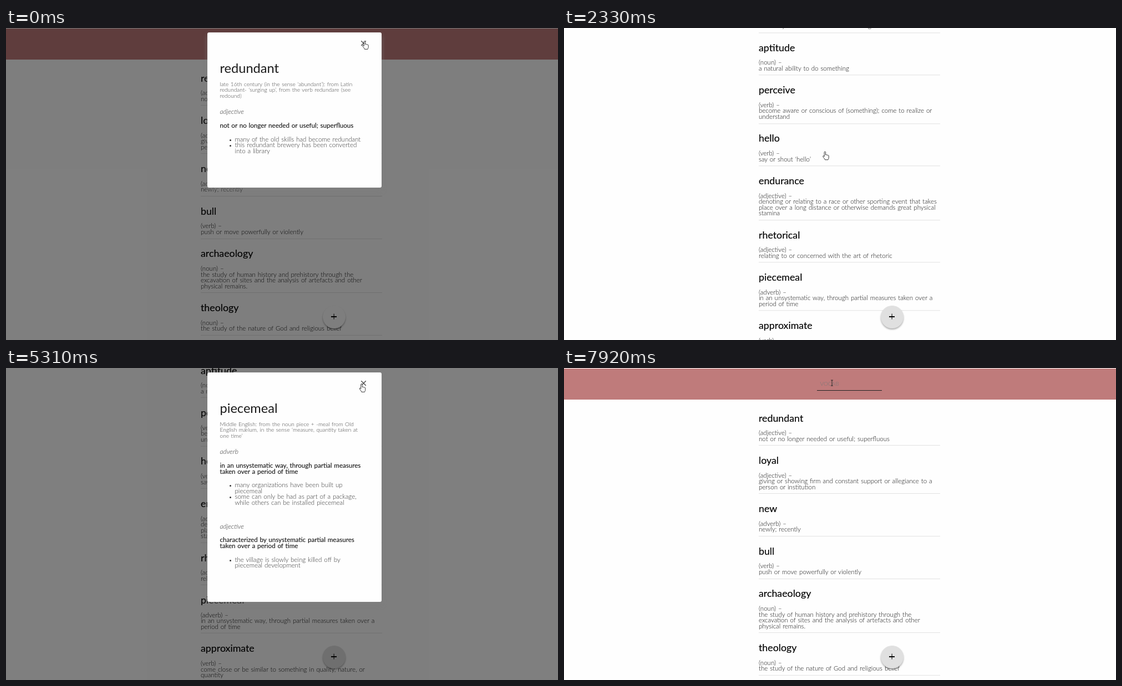
These frames come from a looping animation (995 by 563 pixels, 8000 ms). An HTML page:

```html
<!DOCTYPE html>
<html lang="en">
<head>
<meta charset="utf-8">
<title>Vocabulary list</title>
<style>
  * { margin: 0; padding: 0; box-sizing: border-box; }
  html, body { width: 100%; height: 100%; overflow: hidden; background: #fefefe; }
  body { position: relative; font: 300 11.5px/10.55px Lato, sans-serif; word-spacing: .8px; color: #111; white-space: nowrap; }
  body > *, header * { position: absolute; }

  #page { left: 0; top: 0; width: 995px; }
  header { position: absolute; top: 1px; width: 995px; height: 56px; background: #bf7b7b; }
  #field { left: 456px; top: 15px; width: 117px; height: 25px; padding: 7px 5.5px; border-bottom: 1px solid #222; font-size: 10px; color: #777; }
  #caret { left: 461px; top: 23px; width: 1px; height: 10px; background: #111; }

  #list { position: absolute; left: 351px; top: 79.5px; width: 327px; }
  article { margin-bottom: 15.8px; padding-bottom: 6px; border-bottom: 1px solid #e2e2e2; }
  h2 { margin-bottom: 12.7px; font: 17.8px/20px Lato, sans-serif; color: #000; -webkit-text-stroke: .15px; }

  #add { left: 570.5px; top: 500.5px; width: 41px; height: 41px; border-radius: 50%; box-shadow: 0 2px 3px rgba(0,0,0,.32); }
  #add::before, #add::after { content: ""; position: absolute; left: 15.5px; top: 19.9px; width: 10px; height: 1.2px; background: #000; }
  #add::after { transform: rotate(90deg); }

  .shade { inset: 0; background: rgba(0,0,0,.5); }
  .dialog { position: absolute; left: 362.5px; top: 7.5px; width: 314.5px; padding: 50.5px 23px 47.7px; border-radius: 3px; background: #fefefe; box-shadow: 0 5px 9px rgba(127,127,127,.6); }
  .close { position: absolute; left: 277px; top: 15.5px; width: 9px; height: 9px; stroke: #444; stroke-width: 1.3; }
  h1 { font: 23.6px/28px Lato, sans-serif; color: #1c1c1c; }
  .origin { margin-top: 10px; font-size: 10.1px; line-height: 10.4px; color: #444; }
  .kind { margin-top: 18.2px; font-size: 12px; line-height: 12px; font-style: italic; color: #333; }
  .meaning { margin-top: 13.6px; font-weight: 400; font-size: 11.6px; -webkit-text-stroke: .1px; }
  ul { margin-top: 14.2px; padding: 0 0 13px 27px; list-style: none; color: #333; }
  li { position: relative; }
  li::before { content: ""; position: absolute; left: -9.5px; top: 5px; width: 3px; height: 3px; border-radius: 50%; background: #333; }

  #cursor { left: 0; top: 0; width: 1px; height: 1px; overflow: visible; stroke-width: .9; stroke-linejoin: round; }
</style>
</head>
<body>
<div id="page">
  <header><div id="field">VOCAB</div><div id="caret"></div></header>
  <div id="list"></div>
</div>
<div id="add"></div>
<svg id="cursor"><path fill="#fff" stroke="#222"/></svg>

<script>
const LOOP = 8000, TRAVEL = 400;
const $ = id => document.getElementById(id);
const lines = text => text.replaceAll('|', '<br>');

const words = [
  ['redundant', 'adjective', 'not or no longer needed or useful; superfluous'],
  ['loyal', 'adjective', 'giving or showing firm and constant support or allegiance to a|person or institution'],
  ['new', 'adverb', 'newly; recently'],
  ['bull', 'verb', 'push or move powerfully or violently'],
  ['archaeology', 'noun', 'the study of human history and prehistory through the|excavation of sites and the analysis of artefacts and other|physical remains.'],
  ['theology', 'noun', 'the study of the nature of God and religious belief'],
  ['aptitude', 'noun', 'a natural ability to do something'],
  ['perceive', 'verb', 'become aware or conscious of (something); come to realize or|understand'],
  ['hello', 'verb', 'say or shout ‘hello’'],
  ['endurance', 'adjective', 'denoting or relating to a race or other sporting event that takes|place over a long distance or otherwise demands great physical|stamina'],
  ['rhetorical', 'adjective', 'relating to or concerned with the art of rhetoric'],
  ['piecemeal', 'adverb', 'in an unsystematic way, through partial measures taken over a|period of time'],
  ['approximate', 'verb', 'come close or be similar to something in quality, nature, or|quantity'],
];
$('list').innerHTML = words.map(([word, kind, meaning]) =>
  `<article><h2>${word}</h2><p>(${kind}) –<br>${lines(meaning)}</p></article>`).join('');

function addDialog(word, origin, senses) {
  const shade = document.createElement('div');
  shade.className = 'shade';
  shade.innerHTML = `<div class="dialog">
    <svg class="close" viewBox="0 0 9 9"><path d="M0 0L9 9M9 0L0 9"/></svg>
    <h1>${word}</h1><p class="origin">${lines(origin)}</p>` +
    senses.map(([kind, meaning, ...examples]) =>
      `<p class="kind">${kind}</p><p class="meaning">${lines(meaning)}</p>
       <ul>${examples.map(e => `<li>${lines(e)}</li>`).join('')}</ul>`).join('') + '</div>';
  $('cursor').before(shade);
  return shade;
}
const redundant = addDialog('redundant',
  'late 16th century (in the sense ‘abundant’): from Latin|redundant- ‘surging up’, from the verb redundare (see|redound)',
  [['adjective', 'not or no longer needed or useful; superfluous',
    'many of the old skills had become redundant',
    'this redundant brewery has been converted|into a library']]);
const piecemeal = addDialog('piecemeal',
  'Middle English: from the noun piece + -meal from Old|English mǣlum, in the sense ‘measure, quantity taken at|one time’',
  [['adverb', 'in an unsystematic way, through partial measures|taken over a period of time',
    'many organizations have been built up|piecemeal',
    'some can only be had as part of a package,|while others can be installed piecemeal'],
   ['adjective', 'characterized by unsystematic partial measures|taken over a period of time',
    'the village is slowly being killed off by|piecemeal development']]);

const hand = 'M-2.8 1.5V-6.2a1.2 1.2 0 0 1 2.4 0V-1.5c.5-.8 2-.6 2.1.4 .5-.7 1.8-.4 1.9.5 .6-.5 1.6-.1 1.6.9V3.5C5.2 5.5 4 6 4 7.3H-1.6C-1.6 5.5-5.3 2.6-5.3 1c0-1.2 1.6-1.2 2.5.5z';
const beam = 'M-2-5H2M0-5V5M-2 5H2';

// Each stop is reached at `at`, after an eased move of TRAVEL ms
const pointer = [
  { at: 0, x: 648, y: 31, shape: hand },
  { at: 820, x: 482.5, y: 313, shape: hand },
  { at: 1390, x: 472, y: 230.5, shape: hand },
  { at: 3520, x: 437, y: 422, shape: hand },
  { at: 4350, x: 516.5, y: 240, shape: beam },
  { at: 5100, x: 642.5, y: 36, shape: hand },
  { at: 6670, x: 521, y: 200, shape: hand },
  { at: 7360, x: 483, y: 27, shape: beam },
];
const scroll = [
  { at: 0, y: 0 }, { at: 820, y: 134.5 }, { at: 1270, y: 270 },
  { at: 2330, y: 545.7 }, { at: 2730, y: 577.3 }, { at: 6670, y: 0 },
];

const ease = p => p * p * (3 - 2 * p);
const glide = (stops, axis, t) => stops.reduce((v, s) =>
  v + (s[axis] - v) * ease(Math.min(1, Math.max(0, 1 + (t - s.at) / TRAVEL))), stops[0][axis]);
const show = (el, on) => el.style.visibility = on ? 'visible' : 'hidden';

function draw() {
  const t = performance.now() % LOOP;
  $('page').style.transform = `translateY(${-glide(scroll, 'y', t)}px)`;
  show(redundant, t < 310);
  show(piecemeal, t >= 3770 && t < 5710);
  show($('caret'), t >= 7360 && t < 7920);
  $('add').style.background = t < 310 ? '#fefefe' : '#e0e0e0';
  const path = $('cursor').firstChild;
  path.setAttribute('d', pointer.findLast(s => s.at <= t).shape);
  path.setAttribute('transform', `translate(${glide(pointer, 'x', t)} ${glide(pointer, 'y', t)})`);
  requestAnimationFrame(draw);
}
draw();
</script>
</body>
</html>
```
